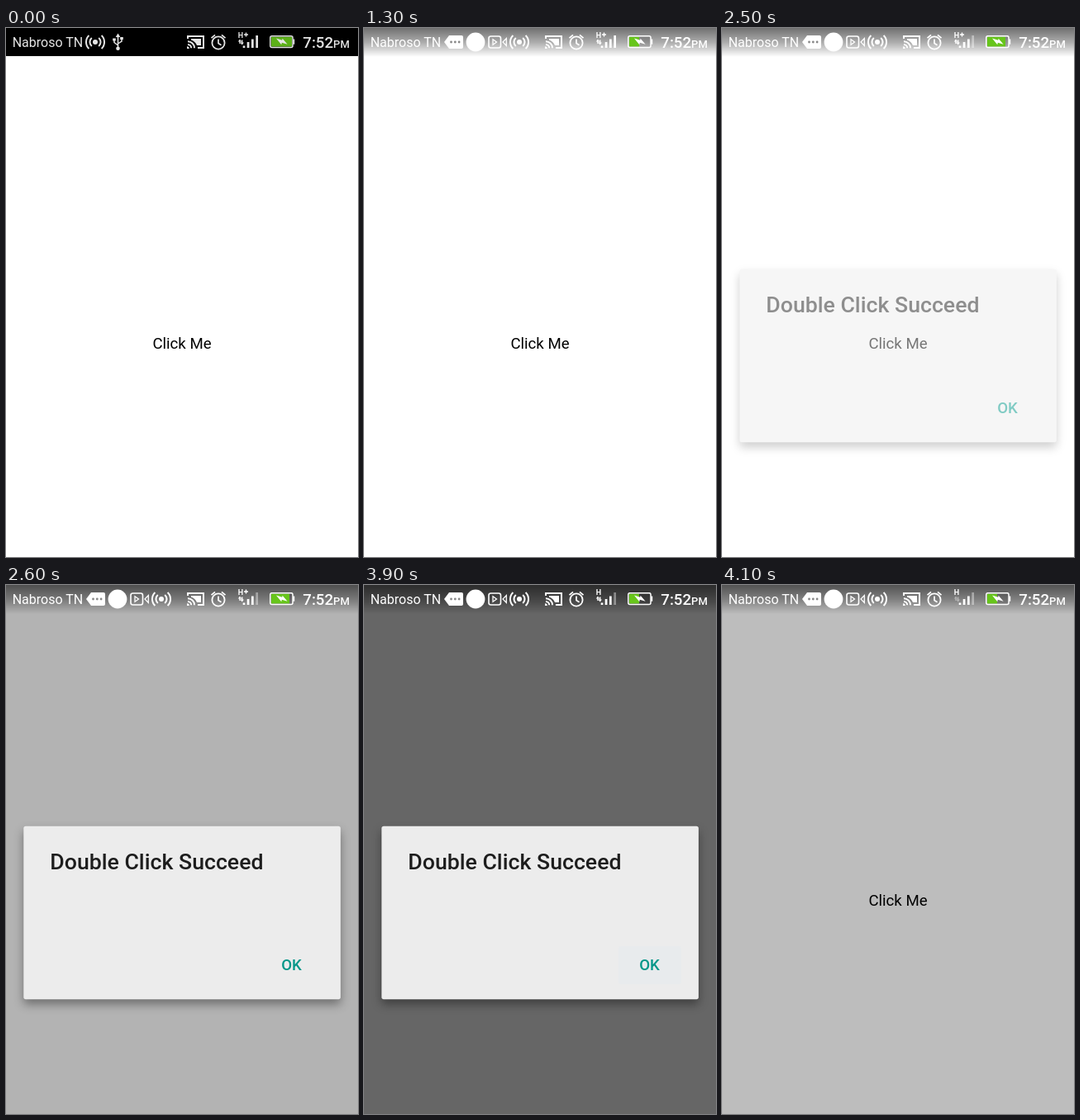
Write an HTML page that moves like this. It is 426 px wide and 640 px high and loops after 4200 ms.

```html
<!DOCTYPE html>
<html lang="en">
<head>
<meta charset="utf-8">
<title>Double click</title>
<style>
  html, body { margin: 0; width: 100%; height: 100%; overflow: hidden; background: #fff; }
  svg { display: block; width: 426px; height: 640px; font-family: Roboto, sans-serif; }
  .line { fill: none; stroke: #fff; stroke-width: 2; }
  .medium { font-weight: 500; }

  /* Every change is a hard step on a 4.2 s loop */
  .label, .dim, .dialog, .ripple, .black, .status, .old, .new, .level, .plus, .last, .arrows {
    animation: 4200ms step-end infinite;
  }
  .label  { animation-name: label; }
  .dim    { animation-name: dim; }
  .dialog { animation-name: dialog; }
  .ripple { animation-name: ripple; }
  .black  { animation-name: black; }
  .status { animation-name: status; }
  .old    { animation-name: old; }
  .new    { animation-name: new; }
  .level  { animation-name: level; }
  .plus   { animation-name: plus; }
  .last   { animation-name: last; }
  .arrows { animation-name: arrows; }
  .panel  { filter: drop-shadow(0 6px 6px rgba(0, 0, 0, .38)); }

  @keyframes label {
    0%, 38.09%, 52.38%, 100% { opacity: 1; }
    35.71%, 50% { opacity: .65; }
  }
  @keyframes dim {
    0%, 100% { opacity: 0; }
    61.9% { opacity: .298; }
    64.28% { opacity: .49; }
    66.66% { opacity: .6; }
    95.23% { opacity: .43; }
    97.61% { opacity: .259; }
  }
  @keyframes dialog {
    0%, 97.61%, 100% { opacity: 0; }
    59.52% { opacity: .5; }
    61.9% { opacity: 1; }
    95.23% { opacity: .4; }
  }
  @keyframes ripple {
    0%, 100% { opacity: 0; }
    92.85% { opacity: 1; }
  }
  @keyframes black {
    0% { opacity: 1; }
    14.28% { opacity: .75; }
    16.66% { opacity: .5; }
    19.04% { opacity: .25; }
    21.42%, 100% { opacity: 0; }
  }
  @keyframes status {
    0% { opacity: .9; }
    14.28%, 100% { opacity: 1; }
  }
  @keyframes old {
    0% { opacity: 1; }
    14.28%, 100% { opacity: 0; }
  }
  @keyframes new {
    0% { opacity: 0; }
    14.28%, 100% { opacity: 1; }
  }
  @keyframes level {
    0%, 38.09%, 64.28%, 85.71% { width: 25px; }
    35.71%, 54.76%, 78.57% { width: 18px; }
    26.19%, 59.52% { width: 22px; }
    30.95%, 47.61%, 73.8%, 92.85%, 100% { width: 12px; }
  }
  @keyframes plus {
    0% { opacity: 1; }
    66.66%, 100% { opacity: 0; }
  }
  @keyframes last {
    0% { opacity: 1; }
    47.61%, 100% { opacity: .4; }
  }
  @keyframes arrows {
    0% { opacity: 1; }
    97.61%, 100% { opacity: .4; }
  }
</style>
</head>
<body>
<svg viewBox="0 0 426 640">
  <defs>
    <linearGradient id="shade" x2="0" y2="1">
      <stop offset="0" stop-opacity=".56"/>
      <stop offset=".5" stop-opacity=".32"/>
      <stop offset="1" stop-opacity="0"/>
    </linearGradient>
    <g id="waves">
      <circle r="3" fill="#fff"/>
      <path class="line" d="M-4.2-5a6.5 6.5 0 0 0 0 10M4.2-5a6.5 6.5 0 0 1 0 10M-7.6-8a11 11 0 0 0 0 16M7.6-8a11 11 0 0 1 0 16"/>
    </g>
  </defs>

  <rect width="426" height="640" fill="#fff"/>
  <text class="label" x="213" y="387.5" font-size="18.67" text-anchor="middle">Click Me</text>
  <rect class="dim" width="426" height="640"/>

  <g class="dialog">
    <rect class="panel" x="21.3" y="291.7" width="383.6" height="209.6" rx="2.7" fill="#ececec"/>
    <rect class="ripple" x="308" y="437" width="76" height="46" rx="3" fill="#e8ebed"/>
    <text class="medium" x="53.3" y="344" font-size="26.67" fill="#1d1d1d">Double Click Succeed</text>
    <text class="medium" x="333.2" y="466" font-size="18.67" fill="#009688">OK</text>
  </g>

  <rect width="426" height="35" fill="url(#shade)"/>
  <rect class="black" width="426" height="34"/>

  <g class="status" fill="#fff">
    <text x="7.7" y="23.2" font-size="16">Nabroso TN</text>

    <g class="old">
      <use href="#waves" x="108" y="17"/>
      <path class="line" stroke-width="1.5" style="stroke-width:1.5" d="M135.5 10v14M135.5 21l-4.5-3.5v-3M135.5 19l4.5-3v-3"/>
      <path d="M135.5 6.5l2.8 4.5h-5.6zM129.2 12.5h3.6v3h-3.6zM138.2 11h3.6v3h-3.6z"/>
      <circle cx="135.5" cy="24.7" r="2.3"/>
    </g>

    <g class="new">
      <path d="M103 9h15q2 0 2 2v12q0 2-2 2h-15l-6-8z"/>
      <g fill="#888">
        <circle cx="105.5" cy="17" r="1.4"/>
        <circle cx="110.3" cy="17" r="1.4"/>
        <circle cx="115.1" cy="17" r="1.4"/>
      </g>
      <circle cx="135" cy="17" r="11.4"/>
      <rect class="line" x="151" y="10" width="14.5" height="14" rx="2.5" style="stroke-width:1.6"/>
      <path class="line" style="stroke-width:1.3" d="M156 13.8v6.4l4.5-3.2zM172.3 12.5v9l-4.3-4.5z"/>
      <use href="#waves" x="188" y="17"/>
    </g>

    <path class="line" d="M220 13v-3h19v14h-7M220 16.2a8 8 0 0 1 8 8M220 20a4.2 4.2 0 0 1 4.2 4.2"/>
    <path d="M219 22.2a2.8 2.8 0 0 1 2.8 2.8H219zM224 13h12v8h-5q-2-5-7-6.5z"/>

    <circle class="line" cx="257" cy="18" r="7.6" style="stroke-width:1.8"/>
    <path class="line" style="stroke-width:1.7" d="M257 13.5v5l3.5 2.2M248.5 12.2l4.5-3.8M265.5 12.2l-4.5-3.8"/>

    <text x="280.8" y="12" font-size="9" font-weight="700">H</text>
    <path class="plus line" style="stroke-width:1.4" d="M288 8h5M290.5 5.5v5"/>
    <g class="arrows">
      <path d="M280.8 16.5l2.2-3 2.2 3zM283.5 17.5h4.4l-2.2 3zM282.3 16h1.4v3h-1.4zM285 14.5h1.4v3H285z"/>
    </g>
    <path d="M286.7 21.5h2.6V24h-2.6zM291.7 17h2.7v7h-2.7zM297 13.5h2.7V24H297z"/>
    <path class="last" d="M302.3 9h2.7v15h-2.7z"/>

    <rect x="320" y="9.7" width="27" height="13.8" rx="2" fill="#000" fill-opacity=".15"/>
    <rect class="level" x="321" y="10.7" width="25" height="11.8" fill="#67c51b"/>
    <rect class="line" x="319.8" y="9.7" width="27.2" height="13.8" rx="2" style="stroke-width:1.5"/>
    <path d="M347.5 13.5h1.7v6.2h-1.7zM327 12.5l7.2 2.2.4-2 6 7-6.8-2-.5 2.6z"/>

    <text class="medium" x="359.3" y="24" font-size="18.67">7:52<tspan font-size="13">PM</tspan></text>
  </g>
</svg>
</body>
</html>
```
